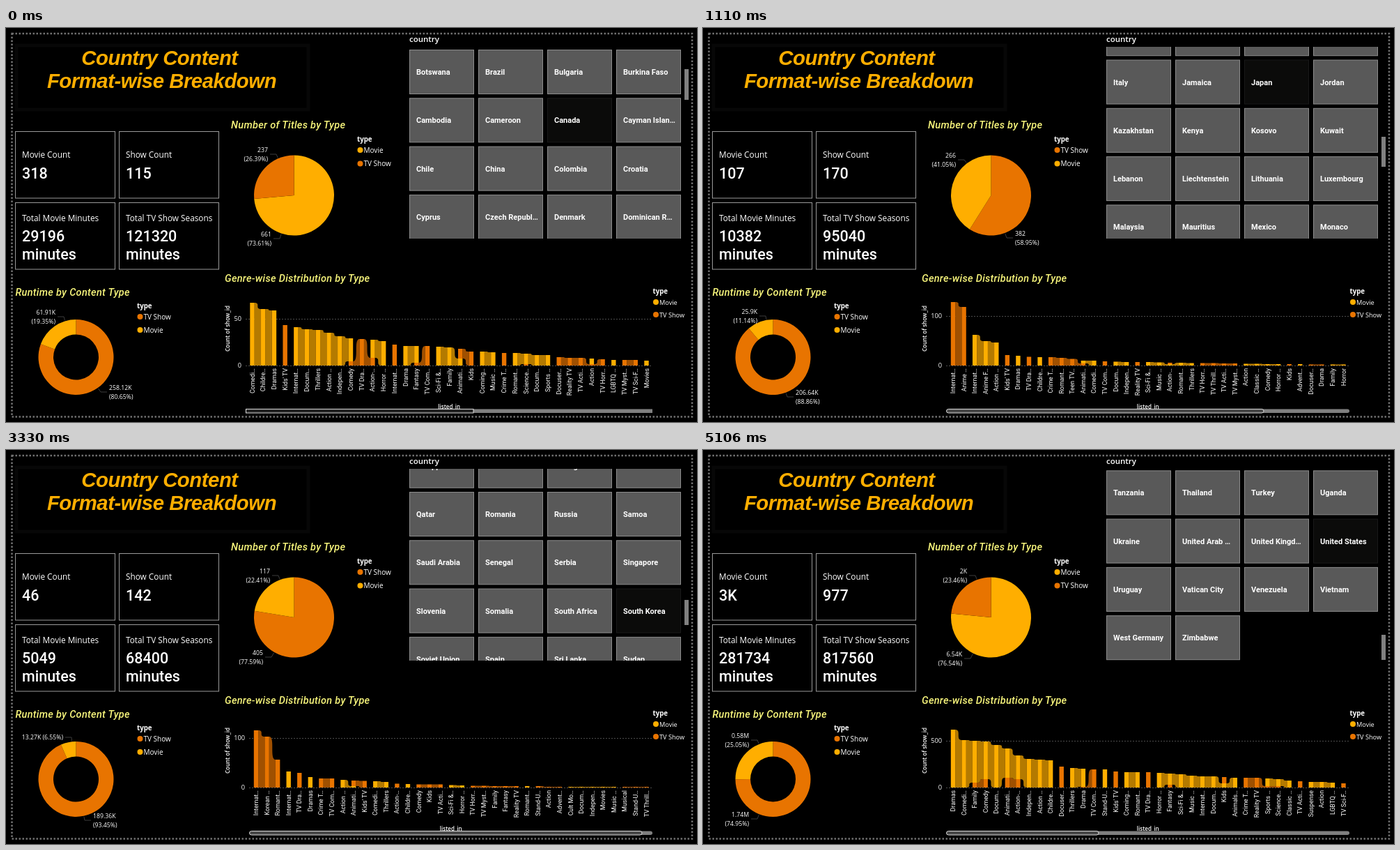
Animation of 992x565 px, one loop 5550 ms. Source, as an HTML page:

```html
<!DOCTYPE html>
<html lang="en">
<head>
<meta charset="utf-8">
<title>Country Content</title>
<style>
html, body { margin: 0; width: 100%; height: 100%; overflow: hidden; background: #000; }
svg { display: block; width: 992px; height: 565px; fill: #fff; font: 10px "Open Sans", "Noto Sans", sans-serif; }
.title { font: italic bold 29.3px "Liberation Sans", Arial, sans-serif; letter-spacing: -.45px; fill: #ffae00; text-anchor: middle; }
.head { font: italic 500 14.5px Roboto, sans-serif; letter-spacing: .3px; fill: #f8f67c; }
.bold { font-weight: 600; }
.key { font-weight: bold; font-size: 9.7px; }
.country { font-weight: 600; font-size: 11.5px; }
.axis-name { font-weight: 600; font-size: 8px; text-anchor: middle; }
.name { font-size: 11.8px; }
.value { font: 500 21.5px Roboto, sans-serif; }
.tile { font: bold 11px Roboto, sans-serif; }
.note { font-size: 8.7px; }
.small { font-size: 9.2px; }
.axis { font: 8.8px Roboto, sans-serif; }
.end { text-anchor: end; }
</style>
</head>
<body>
<svg id="stage" viewBox="0 0 992 565"></svg>
<script>
const HOLD = 1110;
const COLOR = { m: '#ffae00', t: '#e87400' };
const SHADE = { m: '#b47a00', t: '#a05000' };
const SERIES = { m: 'Movie', t: 'TV Show' };
const BASE = 484, LAST_X = 919.5, BAR = 6.4;

// Notes are [text, x, y, side]; bars are "label series+height".
const states = [
  {
    cards: ['318', '115', '29196', '121320'],
    pie: ['m', 73.61, ['237 (26.39%)', 376, 178, -1], ['661 (73.61%)', 381, 299, -1]],
    ring: ['t', 80.65, ['61.91K (19.35%)', 71, 411, -1], ['258.12K (80.65%)', 148, 519, 1]],
    rowY: 31.5, picked: 'Canada', thumb: [59, 44],
    tiles: 'Botswana,Brazil,Bulgaria,Burkina Faso,Cambodia,Cameroon,Canada,Cayman Islan…,Chile,China,Colombia,Croatia,Cyprus,Czech Republ…,Denmark,Dominican R…',
    firstX: 353.5, grid: [50, 417], scroll: [344.5, 671],
    bars: "Comedi… m90|Childre… m81|Dramas m79|Kids' TV t58|Internat… m55|Docum… m52|Thrillers m51|Action … m47|Indepen… m42|Comedy m33 t6|TV Dra… t38|Action-… m26 t11|Horror … m35|Internat… t30|Drama m28|Fantasy m24 t4|TV Com… t28|Sci-Fi &… m27|Family m26|Animati… t14 m10|Kids t20|Coming… m20|Music … m19|Crime T… t18|Romant… m18|Science… m15 t2|Docum… m15|Sports … m15|Docuser… t12|Reality TV t11|TV Acti… t11|Action m8 t2|TV Horr… t9|LGBTQ … m8|TV Myst… t8|TV Sci-F… t8|Movies m7"
  },
  {
    cards: ['107', '170', '10382', '95040'],
    pie: ['t', 58.95, ['266 (41.05%)', 363, 186, -1], ['382 (58.95%)', 448, 298, 1]],
    ring: ['t', 88.86, ['25.9K (11.14%)', 78, 410, -1], ['206.64K (88.86%)', 133, 526, 1]],
    rowY: 46, picked: 'Japan', thumb: [156, 43],
    tiles: 'Italy,Jamaica,Japan,Jordan,Kazakhstan,Kenya,Kosovo,Kuwait,Lebanon,Liechtenstein,Lithuania,Luxembourg,Malaysia,Mauritius,Mexico,Monaco',
    firstX: 359, grid: [100, 413], scroll: [349.5, 805],
    bars: "Internat… t91|Anime … t84|Internat… m44|Anime F… m35|Action … m33|Kids' TV t15|Dramas m14|TV Dra… t12.5|Childre… m12|Crime T… t12|Romant… t11|Teen TV… t9.5|Animati… m4 t3|Comedi… m7|TV Com… t6|Docum… m5.5|Indepen… m5|Reality TV t5|Sci-Fi &… m5|Music … m4.5|Action-… t2 m2|Romant… m4|Thrillers m3.5|TV Horr… t3.5|TV Thrill… t3.5|TV Acti… t3|TV Myst… t3|Action m2.5|Classic … m2.5|Comedy m2|Horror … m2|Kids t2|Advent… m2|Docuser… t1.5|Drama t1.5|Family m1.5|Horror m1.5"
  },
  {
    cards: ['950', '76', '121163', '33480'],
    pie: ['m', 93.44, ['0.18K\u00a0(6.56%)', 388, 181, -1], ['2.49K (93.44%)', 439, 301, 1]],
    ring: ['m', 80.66, ['76.68K (19.34%)', 71, 412, -1], ['319.81K (80.66%)', 147, 519, 1]],
    rowY: 41.5, picked: 'India', thumb: [123, 44],
    tiles: 'Ghana,Greece,Guatemala,Hong Kong,Hungary,Iceland,India,Indonesia,Iran,Iraq,Ireland,Israel,Italy,Jamaica,Japan,Jordan',
    firstX: 359, grid: [500, 417], scroll: [349.5, 718],
    bars: "Internat… m92|Dramas m70|Comedi… m34|Indepen… m18|Drama m15|Action … m15|Internat… m14|Romant… m13|Music … m12|Thrillers m9|Comedy m6 t1.5|Internat… t7|Action m5 t1|Suspense m5|Horror … m4.5|Romance m4|Docum… m3.5|TV Dra… t3|TV Com… t3|Childre… m3|Sports … m2.5|Sci-Fi &… m2|and Cul… m2|Arts m2|Entertai… m2|Kids' TV t1.5|Romant… t1.5|Classic … m1.5|Crime T… t1.5|Horror m1.5|Stand-U… m1.5|TV Acti… t1.2|TV Horr… t1.2|Advent… m1.2|Cult Mo… m1|Docuser… t1|Kids t1"
  },
  {
    cards: ['46', '142', '5049', '68400'],
    pie: ['t', 77.59, ['117 (22.41%)', 379, 177, -1], ['405 (77.59%)', 369, 294, -1]],
    ring: ['t', 93.45, ['13.27K\u00a0(6.55%)', 82, 415, -1], ['189.36K (93.45%)', 125, 528, 1]],
    rowY: -8.8, picked: 'South Korea', thumb: [215, 36],
    tiles: 'Philippines,Poland,Portugal,Puerto Rico,Qatar,Romania,Russia,Samoa,Saudi Arabia,Senegal,Serbia,Singapore,Slovenia,Somalia,South Africa,South Korea,Soviet Union,Spain,Sri Lanka,Sudan',
    firstX: 359, grid: [100, 413], scroll: [349.5, 913],
    bars: "Internat… t82|Korean … t73|Romant… t40|Internat… m23|TV Dra… t21|Dramas m15|Crime T… t13|TV Com… t13|Action … m11|Animati… t8 m2|Kids' TV t9.5|Comedi… m9|Thrillers m8|Action-… t5.5|Childre… m5|Comedy t4.5|Kids t4.5|TV Acti… t4.5|Sci-Fi &… m3.5|Horror … m3|TV Horr… t2.5|TV Myst… t2.5|Family t2|Fantasy t2|Reality TV t2|Romant… m2|Stand-U… t2|Action t1|Advent… t1|Cult Mo… m1|Docum… m1|Indepen… m1|Movies m1|Music … m1|Musical t1|Stand-U… t1|TV Thrill… t1"
  },
  {
    cards: ['3K', '977', '281734', '817560'],
    pie: ['m', 76.54, ['2K (23.46%)', 379, 177, -1], ['6.54K (76.54%)', 372, 296, -1]],
    ring: ['t', 74.95, ['0.58M (25.05%)', 66, 413, -1], ['1.74M (74.95%)', 66, 526, -1]],
    rowY: 29.8, picked: 'United States', thumb: [265, 36],
    tiles: 'Tanzania,Thailand,Turkey,Uganda,Ukraine,United Arab …,United Kingd…,United States,Uruguay,Vatican City,Venezuela,Vietnam,West Germany,Zimbabwe',
    firstX: 359, grid: [500, 417], scroll: [349.5, 568],
    bars: "Dramas m83|Comedi… m68|Family m60 t7|Comedy m54 t12|Docum… m61|Animati… m42 t14|Action-… m34 t12|Indepen… m41|Action … m40|Childre… m39|Docuser… t30|Thrillers m28|Drama m26 t1|TV Com… t26|Stand-U… m26|Kids' TV t23|Coming… m22|Romant… m22|TV Dra… t22|Horror … m21|Fantasy m16 t4|Sci-Fi &… m19|Music … m17|Internat… m16|Docum… m16|Kids t9 m6|Animals… m14|Crime T… t14|Reality TV t14|Sports … m11 t2|Science… m10 t2|Classic … m10|TV Acti… t9|Suspense m8|Action m8|LGBTQ … m7|TV Sci-F… t6"
  }
];

const text = (s, x, y, cls = '') => `<text x="${x}" y="${y}" class="${cls}">${s}</text>`;
const upright = (s, x, y, cls) =>
  `<text transform="translate(${x} ${y}) rotate(-90)" class="${cls}">${s}</text>`;
const rect = (x, y, w, h, fill, more = '') =>
  `<rect x="${x}" y="${y}" width="${w}" height="${h}" fill="${fill}" ${more}/>`;
const line = (points, stroke, more = '') =>
  `<polyline points="${points}" fill="none" stroke="${stroke}" ${more}/>`;
const path = (d, fill) => `<path d="${d}" fill="${fill}"/>`;

function slice(cx, cy, R, r, from, to, fill) {
  const at = (q, turn) => [cx + q * Math.sin(turn * 2 * Math.PI), cy - q * Math.cos(turn * 2 * Math.PI)];
  const big = +(to - from > 0.5);
  return path(`M${at(R, from)}A${R},${R} 0 ${big} 1 ${at(R, to)}L${at(r, to)}` +
    `A${r},${r} 0 ${big} 0 ${at(r, from)}Z`, fill);
}

function note([s, x, y, side], cx, cy, R) {
  const rows = s.split(' ');
  const my = rows.length > 1 ? y + 3 : y - 3;
  const ex = x - side * 12;
  const k = (R + 1) / Math.hypot(ex - cx, my - cy);
  return line([x - side * 3, my, ex, my, cx + (ex - cx) * k, cy + (my - cy) * k], '#3c3c3c') +
    rows.map((row, i) => text(row, x, y + i * 12.5, 'note' + (side < 0 ? ' end' : ''))).join('');
}

function round([first, percent, ...notes], cx, cy, R, r) {
  const part = percent / 100, other = first === 'm' ? 't' : 'm';
  return slice(cx, cy, R, r, 0, part, COLOR[first]) + slice(cx, cy, R, r, part, 1, COLOR[other]) +
    notes.map(n => note(n, cx, cy, R)).join('');
}

function legend(first, x, y, gap, cls = '') {
  const order = first === 'm' ? ['m', 't'] : ['t', 'm'];
  return text('type', x, y, 'key') + order.map((s, i) => {
    const cy = y + 12 + i * gap;
    return `<circle cx="${x + 4.5}" cy="${cy}" r="4" fill="${COLOR[s]}"/>` +
      text(SERIES[s], x + 9.5, cy + 3.5, cls);
  }).join('');
}

function cards(values) {
  const names = ['Movie Count', 'Show Count', 'Total Movie Minutes', 'Total TV Show Seasons'];
  return names.map((name, i) => {
    const x = 13.5 + (i % 2) * 149, low = i > 1, y = low ? 250.5 : 148.5;
    return rect(x, y, 143, 95.5, 'none', 'stroke="#9a9a9a"') +
      text(name, x + 9.5, low ? 277 : 186, 'name') +
      text(values[i], x + 9.5, low ? 306 : 216, 'value') +
      (low ? text('minutes', x + 9.5, 332, 'value') : '');
  }).join('');
}

function slicer({ rowY, tiles, picked, thumb }) {
  const names = tiles.split(',');
  // The row above is only partly in view.
  const above = rowY > 40 ? [0, 1, 2, 3].map(i => tile('', i, rowY - 69.3)).join('') : '';
  function tile(name, i, top) {
    const x = 579.5 + (i % 4) * 99, y = top + Math.floor(i / 4) * 69.3, on = name === picked;
    return rect(x, y, 92, 63, on ? '#0b0b0a' : '#595959', `stroke="${on ? '#191919' : '#8c8c8c'}"`) +
      text(name, x + 9.5, y + 35.5, 'tile');
  }
  return '<clipPath id="view"><rect x="578" y="27" width="393" height="275"/></clipPath>' +
    `<g clip-path="url(#view)">${above}${names.map((n, i) => tile(n, i, rowY)).join('')}</g>` +
    rect(974, thumb[0], 6, thumb[1], '#808080');
}

function chart({ bars, firstX, grid, scroll }) {
  const rows = bars.split('|').map(s => s.match(/^(.*?)((?: [mt][\d.]+)+)$/));
  const step = (LAST_X - firstX) / (rows.length - 1);
  let ribbons = '', columns = '', labels = '', before = {};
  rows.forEach(([, label, parts], i) => {
    const x = firstX + i * step, left = x - BAR / 2, now = {};
    let y = BASE;
    for (const part of parts.trim().split(' ').reverse()) {
      const s = part[0], h = +part.slice(1), top = y - h, old = before[s];
      now[s] = [top, y];
      columns += rect(left, top, BAR, h, COLOR[s]);
      if (old) {
        const x0 = left - step + BAR;
        ribbons += path(`M${x0},${old[0]}C${left},${old[0]} ${x0},${top} ${left},${top}` +
          `V${y}C${x0},${y} ${left},${old[1]} ${x0},${old[1]}Z`, SHADE[s]);
      }
      y = top;
    }
    before = now;
    labels += upright(label, x + 3, 488, 'axis end');
  });
  const [value, gy] = grid, [sx, ex] = scroll, square = sx < 349, rx = square ? 0 : 3;
  const dots = 'stroke-dasharray="1 3"';
  return [[value, gy], [0, BASE]].map(([n, y]) =>
    line([sx, y + .5, 928, y + .5], '#999', dots) + text(n, sx - 6.5, y + 3, 'small end')).join('') +
    ribbons + columns + labels +
    upright('Count of show_id', 321, 431, 'axis-name') +
    text('listed_in', (sx + 928) / 2, 545.5, 'axis-name') +
    rect(sx, 546.5, 928 - sx, 5.5, '#808080', `rx="${rx}"`) +
    rect(sx, 546.5, ex - sx, 5.5, square ? '#222' : '#484848', `rx="${rx}" stroke="#ddd"`);
}

const frame = rect(8.5, 8, 976.5, 549.5, 'none', 'stroke="#707070" stroke-width="2.5" stroke-dasharray="2.5 2.5"') +
  rect(15, 25, 419, 92, 'none', 'stroke="#070707" stroke-width="5"') +
  text('Country Content', 220.5, 53, 'title') + text('Format-wise Breakdown', 223.5, 86, 'title') +
  text('Number of Titles by Type', 323, 144, 'head') +
  text('Runtime by Content Type', 13.5, 384, 'head') +
  text('Genre-wise Distribution by Type', 314, 364, 'head') +
  text('country', 579, 20, 'country') + legend('m', 928.5, 381, 18, 'small');

const draw = s => frame + cards(s.cards) + slicer(s) + chart(s) +
  round(s.pie, 413.5, 240, 57.5, 0) + legend(s.pie[0], 504, 163, 19.5) +
  round(s.ring, 100.5, 472, 54, 32.5) + legend(s.ring[0], 188, 402, 19);

const stage = document.getElementById('stage');
let shown = -1;
function tick() {
  const i = Math.floor(performance.now() / HOLD) % states.length;
  if (i !== shown) stage.innerHTML = draw(states[shown = i]);
  requestAnimationFrame(tick);
}
tick();
</script>
</body>
</html>
```
